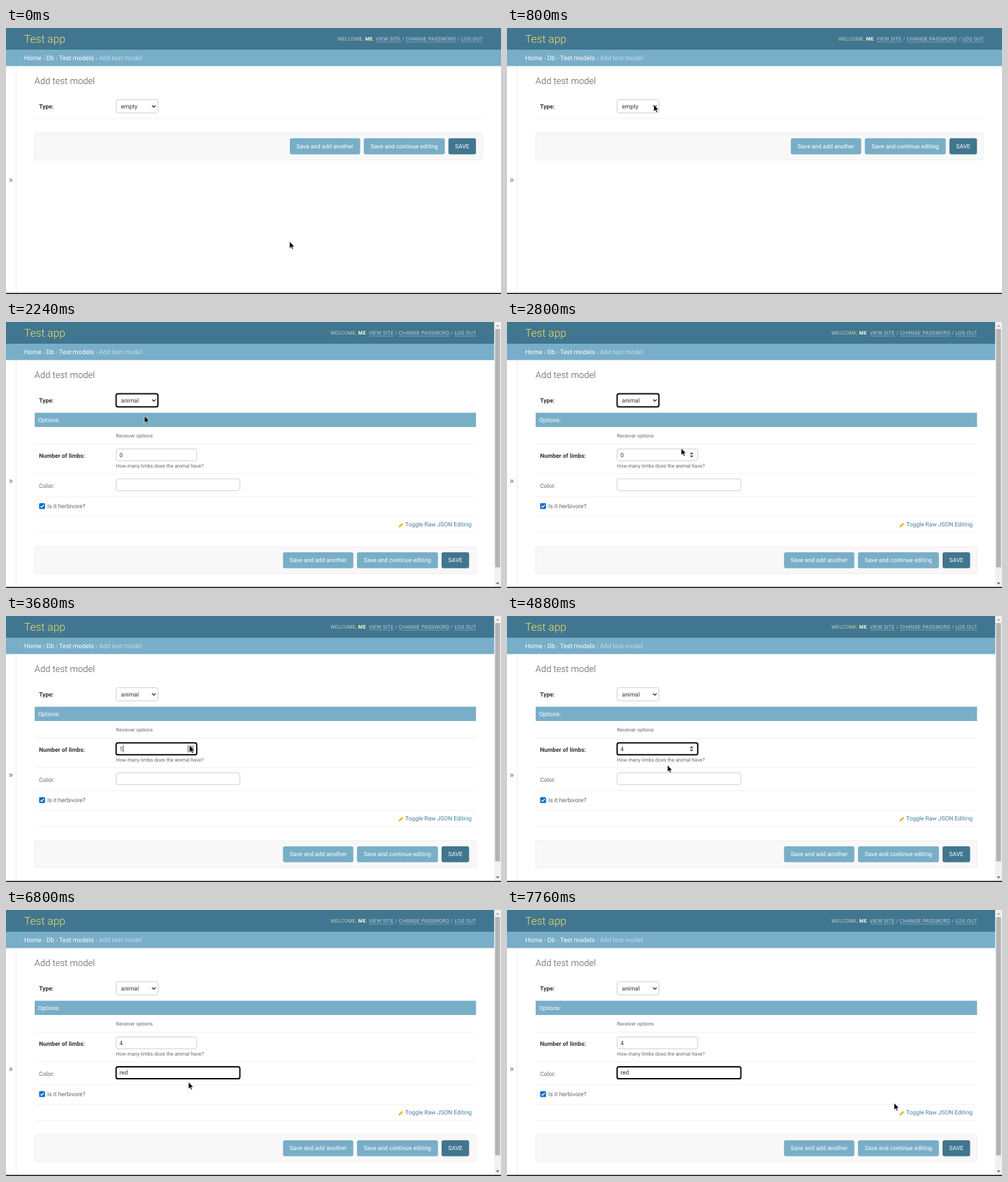
Write an HTML page that moves like this. It is 708 by 380 pixels and loops after 8 s.

```html
<!DOCTYPE html>
<html lang="en">
<head>
<meta charset="utf-8">
<title>Add test model</title>
<style>
  html, body { margin: 0; width: 100%; height: 100%; overflow: hidden; background: #fff; }
  svg { display: block; width: 708px; height: 380px; }
  text { font: 8.45px Roboto, sans-serif; fill: #333; text-rendering: geometricPrecision; white-space: pre; }
  .b { font-weight: 700; }
  .mute { fill: #666; }
  .small { font-size: 7.15px; fill: #666; }
  .btn text { fill: #fff; text-anchor: middle; }
  .tools { font-size: 7.15px; font-weight: 300; letter-spacing: .325px; fill: #fff; text-anchor: end; }
  .line { stroke: #eee; stroke-width: .8; }
  .row { fill: #f8f8f8; stroke: #eaeaea; stroke-width: .7; }
  .field { fill: #fff; stroke: #c4c4c4; stroke-width: .8; }
  .open { stroke: #555; stroke-width: 1; }
  .focus { stroke: #101010; stroke-width: 2; }
</style>
</head>
<body>
<svg viewBox="0 0 708 380">
  <rect width="708" height="31" fill="#417690"/>
  <rect y="31" width="708" height="23.4" fill="#79aec8"/>
  <text x="26" y="20.8" style="font-size:15.6px;font-weight:300;fill:#f0e060">Test app</text>
  <text x="26" y="45.8" style="font-size:9.1px;fill:#c4dce8"><tspan fill="#fff">Home</tspan> › <tspan fill="#fff">Db</tspan> › <tspan fill="#fff">Test models</tspan> › Add test model</text>
  <g id="tools">
    <text class="tools" x="682.3" y="18.1"><tspan fill="#ffc">WELCOME, <tspan class="b">ME</tspan>. </tspan>VIEW SITE / CHANGE PASSWORD / LOG OUT</text>
    <path d="M529 20H565M572 20H644M651 20H682" stroke="#fff" stroke-opacity=".45" stroke-width=".7"/>
  </g>
  <path d="M14.5 54.4V378" stroke="#e8e8e8" stroke-width=".8"/>
  <text id="toggle" x="3.8" style="font-size:13px;fill:#447e9b">»</text>
  <text x="40.8" y="79.6" style="font-size:13px;font-weight:300;fill:#555">Add test model</text>
  <text class="b" x="47.3" y="115">Type:</text>

  <g id="empty">
    <path class="line" d="M41 129.3H682"/>
    <rect class="row" x="41" y="150" width="640.7" height="38.5" rx="2"/>
  </g>

  <g id="animal">
    <rect x="41" y="129.6" width="631.3" height="20.4" fill="#79aec8"/>
    <text x="46" y="143" style="fill:#fff">Options:</text>
    <text class="small" x="157.3" y="164.8">Receiver options</text>
    <path class="line" d="M41 174.5H672M41 216.7H672M41 249.6H672M41 277.6H672M41 300.6H672"/>
    <text class="b" x="47.3" y="194">Number of limbs:</text>
    <rect id="number" class="field" x="157.5" y="181.3" width="115.3" height="17" rx="2.6"/>
    <text id="count" x="162.2" y="192.9"></text>
    <g id="spin">
      <rect id="hover" x="259" y="184.6" width="10" height="10.4" fill="#bbb"/>
      <path d="M261.3 188.8l2.7-2.8 2.7 2.8zM261.3 190.8l2.7 2.8 2.7-2.8z" fill="#444"/>
    </g>
    <text class="small" x="157.3" y="208.2">How many limbs does the animal have?</text>
    <text class="mute" x="47.3" y="236.6">Color:</text>
    <rect id="color" class="field" x="157.5" y="224" width="177" height="17" rx="2.6"/>
    <text id="word" x="162.2" y="235.4"></text>
    <rect id="caret" width=".8" height="10" fill="#222"/>
    <rect x="47.4" y="258.8" width="8.4" height="8.4" rx="1.5" fill="#0d6ecb"/>
    <path d="M49.3 263.1l1.7 1.7 3-3.7" fill="none" stroke="#fff" stroke-width="1.2"/>
    <text class="mute" x="59" y="266.3">Is it herbivore?</text>
    <path d="M562.6 292.4l4.8-4.5" stroke="#efb80b" stroke-width="2.5"/>
    <path d="M561.4 293.6l.6-1.8 1.2 1.2z" fill="#a98a3a"/>
    <text x="571" y="292.3" style="fill:#447e9b">Toggle Raw JSON Editing</text>
    <rect class="row" x="41" y="320.9" width="631.3" height="38.5" rx="2"/>
    <rect x="698.2" width="9.8" height="378.5" fill="#f1f1f1"/>
    <rect x="699.6" y="10" width="7" height="340.5" fill="#b4b4b4"/>
    <path d="M700.8 6.6l2.4-2.6 2.4 2.6z" fill="#999"/>
    <path d="M700.8 372.2l2.4 2.6 2.4-2.6z" fill="#505050"/>
  </g>

  <rect id="select" class="field" x="157.5" y="102.4" width="59.8" height="18.8" rx="2.6"/>
  <text id="kind" x="164.6" y="115"></text>
  <path d="M208.8 110.6l2.6 2.6 2.6-2.6" fill="none" stroke="#222" stroke-width="1.3"/>

  <g id="buttons" class="btn">
    <rect x="406" y="157.6" width="100.6" height="22.8" rx="2.6" fill="#79aec8"/>
    <rect x="511.8" y="157.6" width="115.8" height="22.8" rx="2.6" fill="#79aec8"/>
    <rect x="632.8" y="157.6" width="39.4" height="22.8" rx="2.6" fill="#417690"/>
    <text x="456.2" y="172">Save and add another</text>
    <text x="569.7" y="172">Save and continue editing</text>
    <text x="652.5" y="172">SAVE</text>
  </g>

  <rect y="378.5" width="708" height="1.5" fill="#111"/>
  <path id="arrow" d="M0 0V9.9L2.3 7.8 3.8 11.2 5.4 10.5 3.9 7.2H7Z" fill="#000" stroke="#fff" stroke-width=".6"/>
  <path id="beam" d="M-2.5-5Q0-5 0-4Q0-5 2.5-5M0-4V4M-2.5 5Q0 5 0 4Q0 5 2.5 5" fill="none" stroke="#777" stroke-width=".9"/>
</svg>
<script>
const LOOP = 8000, STEP = 80;
const el = {};
document.querySelectorAll('[id]').forEach(e => el[e.id] = e);

// Pointer moves: first step, last step, x, y
const start = [405.6, 305];
const moves = [
  [400, 480, 229.5, 110], [800, 800, 210, 109.5],
  [2160, 2160, 198, 134.2], [2320, 2880, 256.5, 187],
  [3440, 3440, 262.6, 185], [4640, 4880, 229.5, 213],
  [5200, 5360, 186.5, 234.5], [5680, 5680, 187, 236],
  [6400, 6400, 186.5, 236], [6640, 6640, 188, 236],
  [6800, 7040, 480, 275], [7360, 7360, 485.5, 279],
  [7680, 7760, 553.7, 275.7]
];

function pointer(t) {
  let [x, y] = start;
  for (const [from, to, nx, ny] of moves) {
    if (t < from) break;
    const p = Math.min(1, (t - from + STEP) / (to - from + STEP));
    x += (nx - x) * p;
    y += (ny - y) * p;
  }
  return [x, y];
}

const passed = (t, times) => times.filter(s => t >= s).length;
const within = (t, a, b) => t >= a && t < b;
const inside = ([x, y], l, t, r, b) => x > l && x < r && y > t && y < b;
const show = (e, on) => e.setAttribute('display', on ? 'inline' : 'none');
const shift = (e, x, y) => e.setAttribute('transform', `translate(${x} ${y})`);
const state = (e, name) => e.setAttribute('class', 'field ' + name);

function draw(t) {
  const full = t >= 2240;
  show(el.empty, !full);
  show(el.animal, full);
  shift(el.tools, full ? -9.8 : 0, 0);
  shift(el.buttons, full ? -9.8 : 0, full ? 171.3 : 0);
  el.toggle.setAttribute('y', full ? 230.6 : 220.6);
  el.kind.textContent = full ? 'animal' : 'empty';

  state(el.select, within(t, 1120, 2240) ? 'open' : within(t, 2240, 3680) ? 'focus' : '');
  state(el.number, within(t, 3680, 5360) ? 'focus' : '');
  state(el.color, t >= 5360 ? 'focus' : '');

  el.count.textContent = passed(t, [3680, 3920, 4080, 4240]);
  el.word.textContent = 'red'.slice(0, passed(t, [5840, 6000, 6240]));

  const typing = t >= 5360;
  const input = typing ? el.word : el.count;
  show(el.caret, within(t, 3680, 3760) || within(t, 5360, 6800) || within(t, 7360, 7760));
  el.caret.setAttribute('x', 162.3 + (full ? input.getComputedTextLength() : 0));
  el.caret.setAttribute('y', typing ? 227.4 : 184.7);

  const pos = pointer(t);
  const beam = full && (inside(pos, 157, 181, 256, 199) || inside(pos, 157, 224, 335, 241));
  show(el.beam, beam);
  show(el.arrow, !beam);
  shift(beam ? el.beam : el.arrow, ...pos);
  show(el.spin, within(t, 2800, 5360));
  show(el.hover, inside(pos, 258, 183, 270, 197));
}

function tick() {
  const t = performance.now() % LOOP;
  draw(Math.floor(t / STEP) * STEP);
  requestAnimationFrame(tick);
}
tick();
</script>
</body>
</html>
```
